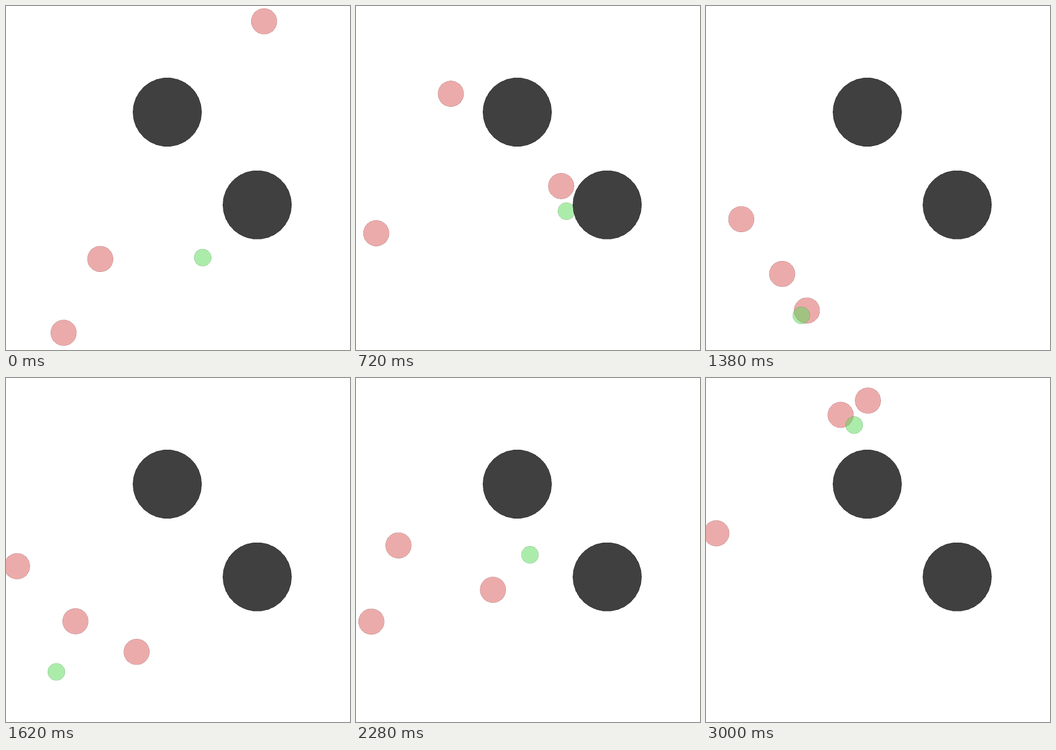
An HTML page that plays this animation: 700x700 px, repeating every 3030 ms.

```html
<!DOCTYPE html>
<html>
<head>
<meta charset="utf-8">
<title>Pursuit</title>
<style>
html, body { margin: 0; width: 100%; height: 100%; overflow: hidden; background: #fff; }
svg { display: block; width: 700px; height: 700px; }
</style>
</head>
<body>
<svg id="stage" viewBox="0 0 700 700" shape-rendering="crispEdges"></svg>
<script>
const stage = document.getElementById('stage');
const STEP = 30, STEPS = 101, SIDES = 30, DRAG = 0.75;
const RED = [217, 89, 89], GREEN = [89, 217, 89], DARK = [64, 64, 64];
const ROCK = 70, ROCKS = [[328.2, 216], [511.2, 404.7]];

// Each agent steers with a steady thrust from one goal to the next
const GOAL_STEPS = [0, 14, 24, 38, 54, 65, 76, 90, 100];
const agents = [
  agent(26.25, RED, [[525.2, 31.2], [226.8, 186], [193, 178.6], [123.5, 413],
    [22.5, 383], [20, 440], [31.3, 495.7], [19, 410], [21, 316]]),
  agent(26.25, RED, [[191.8, 514.8], [191.8, 323], [417.5, 366.4], [225, 614],
    [265.8, 557.3], [262, 590], [278.7, 431], [425, 225], [329.5, 46]]),
  agent(26.25, RED, [[117.2, 665], [117.2, 447.2], [41.2, 462.4], [137, 562.2],
    [141.3, 495], [142, 455], [86.4, 340.7], [190, 110], [274, 75]]),
  agent(17.5, GREEN, [[400.3, 512], [381.6, 372.5], [428.3, 417.5], [291.5, 613.5],
    [102.5, 598], [200, 685], [354, 359.7], [457, 170], [301.5, 95.8]])
];
for (const [x, y] of ROCKS) place(disc(ROCK, DARK, 1), x, y);

function agent(r, color, goals) {
  return { r, shape: disc(r, color, 0.5), axes: [0, 1].map(k => plan(goals.map(g => g[k]))) };
}

// How far a unit of speed and a unit of thrust carry within n steps
function reach(n) {
  const fade = DRAG ** n, coast = 3 * (1 - fade);
  return { fade, coast, push: 4 * (n - coast) };
}

function plan(goals) {
  let v = 0;
  return goals.slice(1).map((goal, i) => {
    const m = reach(GOAL_STEPS[i + 1] - GOAL_STEPS[i]);
    const thrust = (goal - goals[i] - v * m.coast) / m.push;
    const leg = { from: goals[i], v, thrust };
    v = v * m.fade + 4 * thrust * (1 - m.fade);
    return leg;
  });
}

function locate({ r, axes }, n) {
  const i = GOAL_STEPS.findIndex((s, j) => n <= GOAL_STEPS[j + 1]);
  const m = reach(n - GOAL_STEPS[i]);
  let [x, y] = axes.map(legs => legs[i].from + legs[i].v * m.coast + legs[i].thrust * m.push);
  // Slide around the rocks, allowing a slight overlap
  for (const [cx, cy] of ROCKS) {
    const dx = x - cx, dy = y - cy;
    const scale = Math.max(1, (ROCK + r - 4) / Math.hypot(dx, dy));
    x = cx + dx * scale;
    y = cy + dy * scale;
  }
  return [x, y];
}

function disc(r, color, alpha) {
  const shape = document.createElementNS(stage.namespaceURI, 'polygon');
  const points = Array.from({ length: SIDES }, (_, i) => {
    const a = 2 * Math.PI * i / SIDES;
    return [r * Math.cos(a), r * Math.sin(a)];
  });
  shape.setAttribute('points', points.join(' '));
  shape.setAttribute('fill', `rgba(${color}, ${alpha})`);
  shape.setAttribute('stroke', `rgba(${color.map(c => c >> 1)}, ${alpha / 2})`);
  return stage.appendChild(shape);
}

function place(shape, x, y) {
  shape.setAttribute('transform', `translate(${x} ${y})`);
}

const start = performance.now();
function tick() {
  const n = Math.floor((performance.now() - start) / STEP) % STEPS;
  for (const a of agents) place(a.shape, ...locate(a, n));
  requestAnimationFrame(tick);
}
tick();
</script>
</body>
</html>
```
